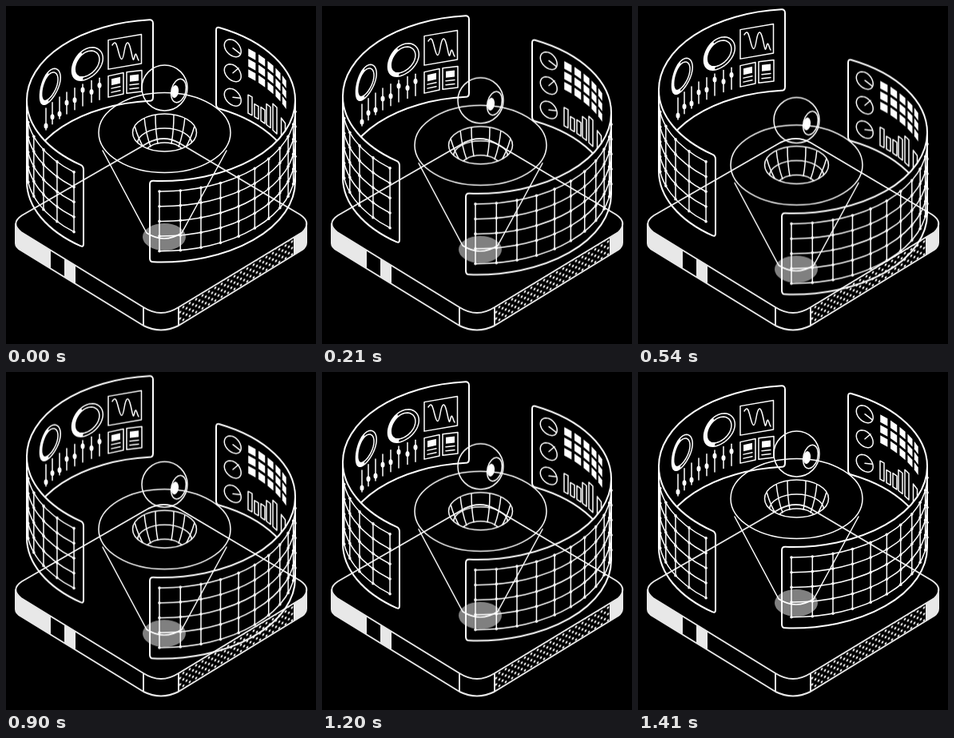
Write an HTML page that moves like this. It is 388x423 px and loops after 1470 ms.

```html
<!DOCTYPE html>
<html lang="en">
<head>
<meta charset="utf-8">
<title>Control room</title>
<style>
html, body { margin: 0; width: 100%; height: 100%; overflow: hidden; background: #000; }
svg { display: block; width: 388px; height: 423px; }
g { fill: none; stroke: #fff; stroke-width: 2; stroke-linejoin: round; stroke-linecap: round; }
.thin { stroke-width: 1.5; }
.solid { fill: #fff; stroke: none; }
.base { stroke: #e8e8e8; }
.base .solid { fill: #e8e8e8; }
.rise, .sink { animation: travel 1470ms steps(18) infinite; }
.rise { --y: -13px; }
.sink { --y: 40.5px; }
@keyframes travel {
  0%, 95.9184%, 100% { transform: translateY(0); }
  36.7347%, 59.1837% { transform: translateY(var(--y)); }
}
</style>
</head>
<body>
<svg viewBox="0 0 388 423">
  <defs>
    <clipPath id="behind"><path d="M-9-99H400V118H362A168 101 0 0 1 26 118H-9Z"/></clipPath>
    <clipPath id="hole"><ellipse cx="198.5" cy="158.5" rx="40" ry="23.5"/></clipPath>
    <pattern id="dots" width="8" height="8" patternUnits="userSpaceOnUse" patternTransform="skewY(-31)">
      <circle cx="2" cy="2" r="1.5" fill="#e8e8e8"/>
      <circle cx="6" cy="6" r="1.5" fill="#e8e8e8"/>
    </pattern>
  </defs>

  <g class="base">
    <path d="M20 262L178 171Q198 161 216 171L368 261Q383 271 371 283L216 377Q194 391 172 377L19 283Q5 272 20 262Z"/>
    <path d="M12 273V297Q12 302 19 306L172 400Q194 411 216 400L371 305Q376 301 376 296V273M172 378V400M216 378V400"/>
    <path class="solid" d="M12 274Q13 280 19 283L56 306V329L19 306Q12 302 12 297ZM73 316L87 325V348L73 339ZM360 290L371 283Q376 278 376 274V296Q376 301 371 305L360 312Z"/>
    <path d="M217 377L360 290V311L217 399Z" fill="url(#dots)" stroke="none"/>
  </g>

  <g class="rise" id="left"></g>

  <g class="sink">
    <ellipse cx="198" cy="289" rx="27" ry="17" fill="#808080" stroke="none"/>
    <g id="right"></g>
    <g class="thin">
      <ellipse cx="198.5" cy="158.5" rx="82.5" ry="50"/>
      <ellipse cx="198.5" cy="158.5" rx="40" ry="23.5"/>
      <g class="thin" clip-path="url(#hole)">
        <ellipse cx="198.5" cy="172" rx="34" ry="19"/>
        <ellipse cx="198.5" cy="184" rx="24" ry="13"/>
        <path d="M161 150Q166 168 174 180M173 139Q175 160 181 176M187 136Q187 156 190 172M210 136Q210 156 207 172M224 139Q222 160 216 176M236 150Q231 168 223 180"/>
      </g>
      <path d="M121 181L176 284Q198 298 220 284L276 181"/>
      <circle cx="198.5" cy="102.5" r="28.5"/>
      <ellipse cx="216" cy="106" rx="9" ry="15" transform="rotate(14 216 106)"/>
      <ellipse class="solid" cx="211.5" cy="107" rx="4.5" ry="8" transform="rotate(8 211 107)"/>
    </g>
  </g>
</svg>
<script>
const CX = 194, CY = 118, RX = 168, RY = 101, H = 101.5, MID = Math.PI / 2;
const { sin, cos, asin, sqrt, PI } = Math;

// Point on the cylinder: angle a from the front, h pixels below its top rim.
const at = (a, h) => [CX + RX * sin(a), CY + RY * cos(a) + h];
// Point on the far wall at screen position x.
const wall = (x, h) => [x, CY - RY * sqrt(1 - ((x - CX) / RX) ** 2) + h];
const wallAngle = x => Math.sign(x - CX) * (PI - asin(Math.abs(x - CX) / RX));
const str = p => p.map(v => v.toFixed(2)).join(' ');
const poly = pts => 'M' + pts.map(str).join('L');
const arc = (a, b, h) => `A${RX} ${RY} 0 0 ${b > a ? 0 : 1} ${str(at(b, h))}`;

function add(parent, tag, attrs) {
  const el = document.createElementNS('http://www.w3.org/2000/svg', tag);
  for (const k in attrs) el.setAttribute(k, attrs[k]);
  return parent.appendChild(el);
}
const draw = (parent, d, cls = '') => add(parent, 'path', { d, class: cls });

// Half of a screen, from the silhouette to its rounded free edge.
function half(mid, end) {
  const near = end + Math.sign(mid - end) * 0.026;
  return `M${str(at(mid, 0))}${arc(mid, near, 0)}Q${str(at(end, 0))} ${str(at(end, 4.5))}` +
    `L${str(at(end, H - 4.5))}Q${str(at(end, H))} ${str(at(near, H))}${arc(near, mid, H)}Z`;
}

function grid(parent, start, step, mid) {
  const rows = [0, 1, 2, 3, 4].map(i => 13 + i * 18.7);
  const g = add(parent, 'g', { class: 'thin' });
  rows.forEach(h => draw(g, `M${str(at(start, h))}${arc(start, mid, h)}`));
  for (let a = start; Math.abs(a) < MID; a += step) {
    draw(g, poly([at(a, rows[0]), at(a, rows[4])]));
    rows.forEach(h => {
      const [cx, cy] = at(a, h);
      add(g, 'circle', { cx, cy, r: 1.8, class: 'solid' });
    });
  }
}

function screen(id, mid, front, back, step) {
  const root = document.getElementById(id);
  const far = add(root, 'g', { 'clip-path': 'url(#behind)' });
  draw(far, half(mid, back));
  draw(root, half(mid, front));
  grid(root, front + Math.sign(step) * (id === 'left' ? 0.09 : 0.0715), step, mid);
  return add(far, 'g', { class: 'thin' });
}

const box = (x0, x1, h0, h1) =>
  poly([wall(x0, h0), wall(x1, h0), wall(x1, h1), wall(x0, h1)]) + 'Z';

// Points of a circle wrapped on the far wall.
function ring(x, h, r, from = 0, to = 2 * PI) {
  const a = wallAngle(x);
  return Array.from({ length: 49 }, (_, i) => {
    const t = from + (to - from) * i / 48;
    return at(a + r / RX * cos(t), h + r * 0.82 * sin(t));
  });
}

const left = screen('left', -MID, -0.6155, wallAngle(184), -0.18);
for (const [x, from, to] of [[54, -1.5, 1.5], [101, -1.2, 1.3]]) {
  draw(left, poly(ring(x, 38.5, 23.4)));
  draw(left, poly(ring(x, 38.5, 18.5)));
  draw(left, poly([...ring(x, 38.5, 23.4, from, to), ...ring(x, 38.5, 18.5, to, from)]) + 'Z', 'solid');
}
draw(left, box(128, 169.5, 17.5, 54));
draw(left, 'M133 49C137 43 138 46 141 58S146 69 148 57S153 41 156 54S159 71 161 63S164 66 166 68');
for (const x of [128, 151]) {
  draw(left, box(x, x + 19, 62.5, 89));
  draw(left, box(x + 4, x + 15, 67, 75), 'solid');
  for (const h of [79, 84]) draw(left, poly([wall(x + 4, h), wall(x + 15, h)]));
}
[[50, 84], [58, 80], [67, 83], [76, 75], [86, 77], [96, 69], [107, 76], [117, 71]].forEach(([x, h]) => {
  draw(left, poly([wall(x, 62), wall(x, 89)]));
  const [cx, cy] = wall(x, h);
  add(left, 'ellipse', { cx, cy, rx: 2.5, ry: 3.5, class: 'solid' });
});

const right = screen('right', MID, -0.0834, wallAngle(263), PI / 20);
[[20, 9, 7], [51, 7, -6], [81.5, 9, 1]].forEach(([h, dx, dy]) => {
  draw(right, poly(ring(284, h, 12.4)));
  const [x, y] = wall(284, h);
  draw(right, `M${x} ${y}l${dx} ${dy}`);
});
for (let col = 0; col < 5; col++) {
  const a = 0.745 + col * 0.105;
  const [x0, x1] = [a - 0.037, a + 0.037].map(v => CX + RX * sin(v));
  for (const h of [12, 25, 38]) draw(right, box(x0, x1, h, h + 9.5), 'solid');
}
[[303, 70], [311, 77], [319, 76], [326, 67], [334, 60], [344.5, 67]].forEach(([x, h]) =>
  draw(right, box(x, x + 5, h, 93)));
</script>
</body>
</html>
```
